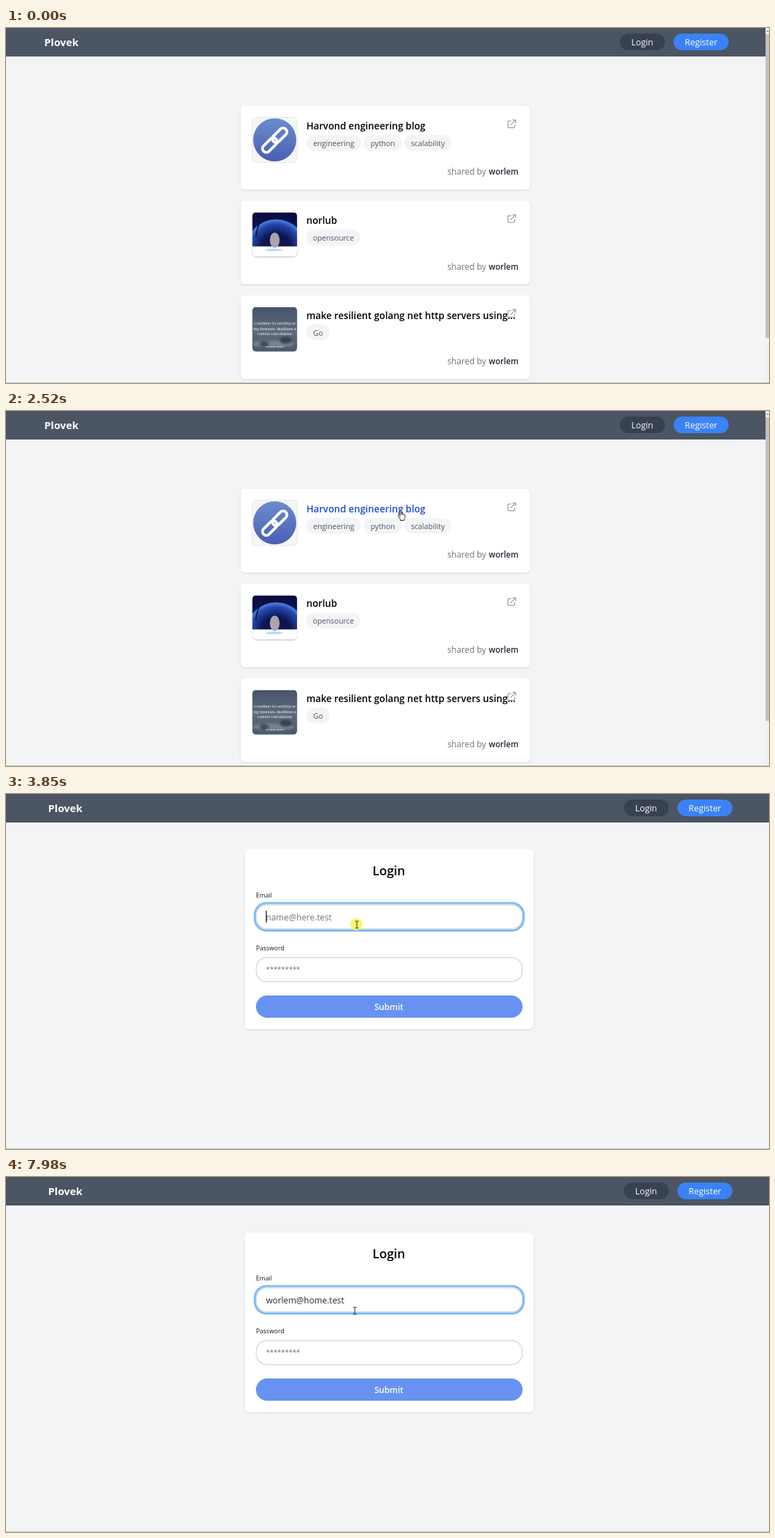
An HTML page for the animation above (8 s loop, 1096 by 511 pixels).

```html
<!DOCTYPE html>
<html lang="en">
<head>
<meta charset="utf-8">
<title>Link sharing</title>
<style>
  html, body { margin: 0; width: 100%; height: 100%; overflow: hidden; background: #f3f4f6; }
  svg { display: block; width: 100vw; height: 100vh; }
  text { font-family: "Open Sans", "Noto Sans", sans-serif; white-space: pre; }
  .serif { font-family: "Noto Serif", serif; }
</style>
</head>
<body>
<svg id="stage" viewBox="0 0 1096 511" preserveAspectRatio="none">
  <defs>
    <linearGradient id="disc" x2="0" y2="1"><stop stop-color="#6a8dcc"/><stop offset="1" stop-color="#4a5fb4"/></linearGradient>
    <linearGradient id="sky" x2="0" y2="1"><stop stop-color="#070a3c"/><stop offset="1" stop-color="#17246e"/></linearGradient>
    <radialGradient id="globe"><stop offset=".5" stop-color="#0e1550"/><stop offset=".85" stop-color="#2448ae"/><stop offset="1" stop-color="#4f86e6"/></radialGradient>
    <linearGradient id="slate" x2="0" y2="1"><stop stop-color="#46536b"/><stop offset=".55" stop-color="#5e6a7b"/><stop offset="1" stop-color="#4d596a"/></linearGradient>
    <clipPath id="thumb"><rect x="354" y="129" width="64" height="64" rx="5"/></clipPath>
    <filter id="shadow" x="-5%" y="-5%" width="110%" height="112%">
      <feDropShadow dx="0" dy="1" stdDeviation="1" flood-opacity=".15"/>
    </filter>
    <filter id="soft"><feGaussianBlur stdDeviation="1.6"/></filter>
  </defs>
</svg>
<script>
const stage = document.getElementById("stage");
const LOOP = 8000, FORM_AT = 2650, FOCUS_AT = 3850, CLICK = 210;
const EMAIL = "worlem@home.test";
const KEY_TIMES = [4050, 4320, 4520, 4650, 4780, 4990, 5720, 6250,
                   6390, 6500, 6610, 6790, 6990, 7090, 7190, 7450];

const label = (x, y, size, fill, str, extra = "") =>
  `<text x="${x}" y="${y}" font-size="${size}" fill="${fill}" ${extra}>${str}</text>`;
const box = (x, y, w, h, rx, fill, extra = "") =>
  `<rect x="${x}" y="${y}" width="${w}" height="${h}" rx="${rx}" fill="${fill}" ${extra}/>`;
const MIDDLE = 'text-anchor="middle"', SEMI = 'font-weight="600"';

const header = `
  ${box(0, 0, 1096, 41, 0, "#4b5563")}
  <g id="nav">
    ${label(55, 26.3, 14.9, "#fff", "Plovek", 'font-weight="700"')}
    ${box(882, 8, 64.5, 24, 12, "#374151")}
    ${label(914, 25.2, 12.4, "#fff", "Login", MIDDLE + ' id="navLogin"')}
    ${box(959, 8, 79, 24, 12, "#3b82f6")}
    ${label(998.5, 25.2, 12.4, "#fff", "Register", MIDDLE)}
  </g>`;

const chain = `
  <circle cx="386" cy="161" r="31" fill="url(#disc)"/>
  <g transform="translate(386 161.5) rotate(-45)" fill="none" stroke="#fff" stroke-width="4">
    <rect x="-22.5" y="-5.5" width="25" height="11" rx="5.5"/>
    <rect x="-2.5" y="-5.5" width="25" height="11" rx="5.5"/>
  </g>`;

const space = `
  ${box(354, 129, 64, 49, 0, "url(#sky)")}
  <circle cx="388" cy="182" r="43" fill="url(#globe)"/>
  <path d="M359 165C360 142 373 132 388 131" fill="none" stroke="#0a0d33" stroke-width="1.5"/>
  ${box(354, 178, 64, 16, 0, "#fff")}
  <ellipse cx="385" cy="183" rx="13" ry="1.8" fill="#b9dcf5"/>
  <ellipse cx="386" cy="169" rx="7" ry="11" fill="#aaa5ae"/>`;

const slate = `
  ${box(354, 129, 64, 64, 0, "url(#slate)")}
  <g filter="url(#soft)">
    <ellipse cx="384" cy="182" rx="30" ry="5" fill="#78828f"/>
    <ellipse cx="402" cy="177" rx="9" ry="5" fill="#39434f"/>
    <ellipse cx="371" cy="182" rx="7" ry="4" fill="#424c59"/>
  </g>
  ${["r resilient Go net/http se", "ing timeouts, deadlines a", "context cancellation"].map((s, i) =>
    label(386, 154.3 + i * 7.6, 5.2, "#f1f3f5", s, MIDDLE + ' class="serif"')).join("")}
  ${label(386, 187.5, 4.2, "#e5e7eb", "written notes", MIDDLE + ' class="serif" font-style="italic"')}`;

// tags: [x, width, text]
const card = (i, title, tags, image, id = "") => `
  <g transform="translate(0 ${i * 136.4})">
    ${box(337, 112, 415.5, 120.5, 6, "#fff", 'filter="url(#shadow)"')}
    ${box(353.5, 128.5, 65, 65, 6, i ? "#fff" : "#f5f6f7", 'stroke="#e5e7eb"')}
    <g clip-path="url(#thumb)">${image}</g>
    ${label(431.5, 145.8, 13.7, "#000", title, SEMI + id)}
    ${tags.map(([x, w, s]) => box(x, 154, w, 22.5, 11.2, "#f3f4f6") +
      label(x + w / 2, 169.8, 10.7, "#4b5563", s, MIDDLE)).join("")}
    <path transform="translate(718.2 129.7) scale(.69)" fill="none" stroke="#9ca3af" stroke-width="1.9" stroke-linecap="round" stroke-linejoin="round"
      d="M10 6H6a2 2 0 00-2 2v10a2 2 0 002 2h10a2 2 0 002-2v-4M14 4h6m0 0v6m0-6L10 14"/>
    ${label(634, 211.3, 12.2, "#6b7280", "shared by")}
    ${label(736, 211.3, 11.6, "#1f2937", "worlem", SEMI + ' text-anchor="end"')}
  </g>`;

const list = `
  <g id="list">
    ${card(0, "Harvond engineering blog", [[431.5, 78.5, "engineering"], [514, 54.5, "python"], [572, 68, "scalability"]], chain, ' id="blog"')}
    ${card(1, "norlub", [[431.5, 77.5, "opensource"]], space)}
    ${card(2, "make resilient golang net http servers using…", [[431.5, 33.5, "Go"]], slate)}
    ${box(1091, 0, 5, 511, 0, "#f1f1f1")}
    ${box(1091, 9, 5, 437, 0, "#c1c1c1")}
    <path d="M1092 5.5l2-2.5 2 2.5z" fill="#8a8a8a"/>
  </g>`;

const field = y => box(359.5, y + .5, 382, 34.5, 15, "#fff", 'stroke="#d5d7dc" stroke-width="1.4"');
const form = `
  <g id="form">
    ${box(343, 80, 414.5, 258.5, 6, "#fff", 'filter="url(#shadow)"')}
    ${label(550, 117.3, 17.9, "#000", "Login", MIDDLE + SEMI)}
    ${label(359, 149.2, 9.1, "#111827", "Email")}
    ${box(357.5, 157, 386, 39.5, 17, "none", 'id="ring" stroke="#7dbcf8" stroke-width="3.2"')}
    ${field(159)}
    ${label(373.5, 181.7, 12.27, "#757575", "name@here.test", 'id="hint"')}
    ${label(373.5, 181.7, 12.27, "#1f2937", "", 'id="typed"')}
    ${box(373.3, 168, 1.2, 17, 0, "#000", 'id="caret"')}
    ${label(359, 225.3, 9.1, "#111827", "Password")}
    ${field(235)}
    ${label(373.5, 256.3, 9.9, "#757575", "*********")}
    ${box(359, 290, 383, 32, 16, "#6792f1")}
    ${label(550, 311, 12.1, "#fff", "Submit", MIDDLE + SEMI)}
  </g>`;

const pointer = `
  <circle id="click" r="8.8" fill="#fdf469" fill-opacity=".95"/>
  <g id="pointer" stroke="#111" stroke-width=".9" fill="#fff" stroke-linejoin="round">
    <path id="arrow" d="M0 0V11.6L2.7 9.1 4.5 13 6.1 12.3 4.5 8.5H8.2Z"/>
    <path id="hand" d="M-1 1V8L-2.2 6.6C-3.4 5.8-4.2 6.8-3.5 7.9L-.6 12.5V14H5V12.4C6 10.5 6.1 9 6.1 6.4 6 5.2 4.6 5.1 4.4 6 4.2 4.8 2.9 4.7 2.7 5.5 2.4 4.4 1.2 4.5 1 5V1C.9-.3-.9-.3-1 1Z"/>
    <path id="beam" fill="none" d="M-2.5-5H-.5L0-4.5.5-5H2.5M0-4.5V4.5M-2.5 5H-.5L0 4.5.5 5H2.5"/>
  </g>`;

stage.insertAdjacentHTML("beforeend",
  header + list + form + box(0, 510, 1096, 1, 0, "#c4c6c9") + pointer);

const el = {};
stage.querySelectorAll("[id]").forEach(n => el[n.id] = n);
const show = (node, on) => node.setAttribute("display", on ? "inline" : "none");

// Pointer moves: points are evenly spaced in progress
const MOVES = [
  { from: 190, to: 390, steps: 4, points: [[1060, 520], [1052, 480], [1034, 390], [1016, 307]] },
  { from: 590, to: 1330, steps: 11, points: [[1016, 307], [1010, 270], [975, 150], [935, 50], [923, 25], [920, 17]] },
  { from: 1740, to: 2520, steps: 11, points: [[920, 17], [990, 60], [1042, 250], [940, 498], [800, 470], [640, 260], [567, 143.5]] },
  { from: 2790, to: 3320, steps: 9, points: [[567, 143.5], [600, 106], [690, 112], [714, 140], [640, 180], [540, 192], [497, 194.8]] },
  { from: 3590, to: 3650, steps: 2, points: [[497, 194.8], [501, 190], [504, 188]] },
  { from: 7980, to: 7980, steps: 1, points: [[504, 188], [501, 192.5]] }
];

function along(points, p) {
  const s = p * (points.length - 1), i = Math.min(Math.floor(s), points.length - 2);
  return [0, 1].map(k => points[i][k] + (points[i + 1][k] - points[i][k]) * (s - i));
}

function pointerAt(t) {
  const m = MOVES.filter(v => t >= v.from).pop();
  if (!m) return null;
  const gap = (m.to - m.from) / Math.max(1, m.steps - 1);
  const done = gap ? Math.floor((t - m.from) / gap + 1e-6) + 1 : 1;
  return along(m.points, Math.min(1, done / m.steps));
}

const inside = ([x, y], x0, y0, x1, y1) => x >= x0 && x <= x1 && y >= y0 && y <= y1;

function draw(t) {
  const onForm = t >= FORM_AT, focused = t >= FOCUS_AT;
  show(el.list, !onForm);
  show(el.form, onForm);
  el.nav.setAttribute("transform", `translate(${onForm ? 5.5 : 0} 0)`);

  const pos = pointerAt(t);
  show(el.pointer, pos);
  let kind = "arrow", overLogin = false, overBlog = false;
  if (pos) {
    if (t < 2790) {
      overLogin = inside(pos, 882, 8, 946, 32);
      overBlog = inside(pos, 431, 132, 607, 151);
      if (overLogin || overBlog || inside(pos, 959, 8, 1038, 32)) kind = "hand";
    } else if (inside(pos, 359, 159, 742, 194.5)) kind = "beam";
    el.pointer.setAttribute("transform", `translate(${pos[0]} ${pos[1]})`);
  }
  for (const k of ["arrow", "hand", "beam"]) show(el[k], k === kind);
  el.navLogin.setAttribute("fill", overLogin ? "#c3c8d0" : "#fff");
  el.blog.setAttribute("fill", overBlog ? "#1d4ed8" : "#000");

  const clickAt = [1520, FOCUS_AT].find(c => t >= c && t < c + CLICK - 10);
  show(el.click, clickAt);
  el.click.setAttribute("transform", clickAt === FOCUS_AT ? "translate(503.3 187.5)" : "translate(920 17)");

  const count = KEY_TIMES.filter(k => t >= k).length;
  el.typed.textContent = EMAIL.slice(0, count);
  show(el.hint, !count);
  show(el.ring, focused);
  show(el.caret, focused && t < 7980 && !(t >= 5520 && t < 5720));
  const width = onForm && count ? el.typed.getComputedTextLength() : 0;
  el.caret.setAttribute("x", 373.3 + width);
}

const start = performance.now();
function tick() {
  draw((performance.now() - start) % LOOP);
  requestAnimationFrame(tick);
}
tick();
</script>
</body>
</html>
```
